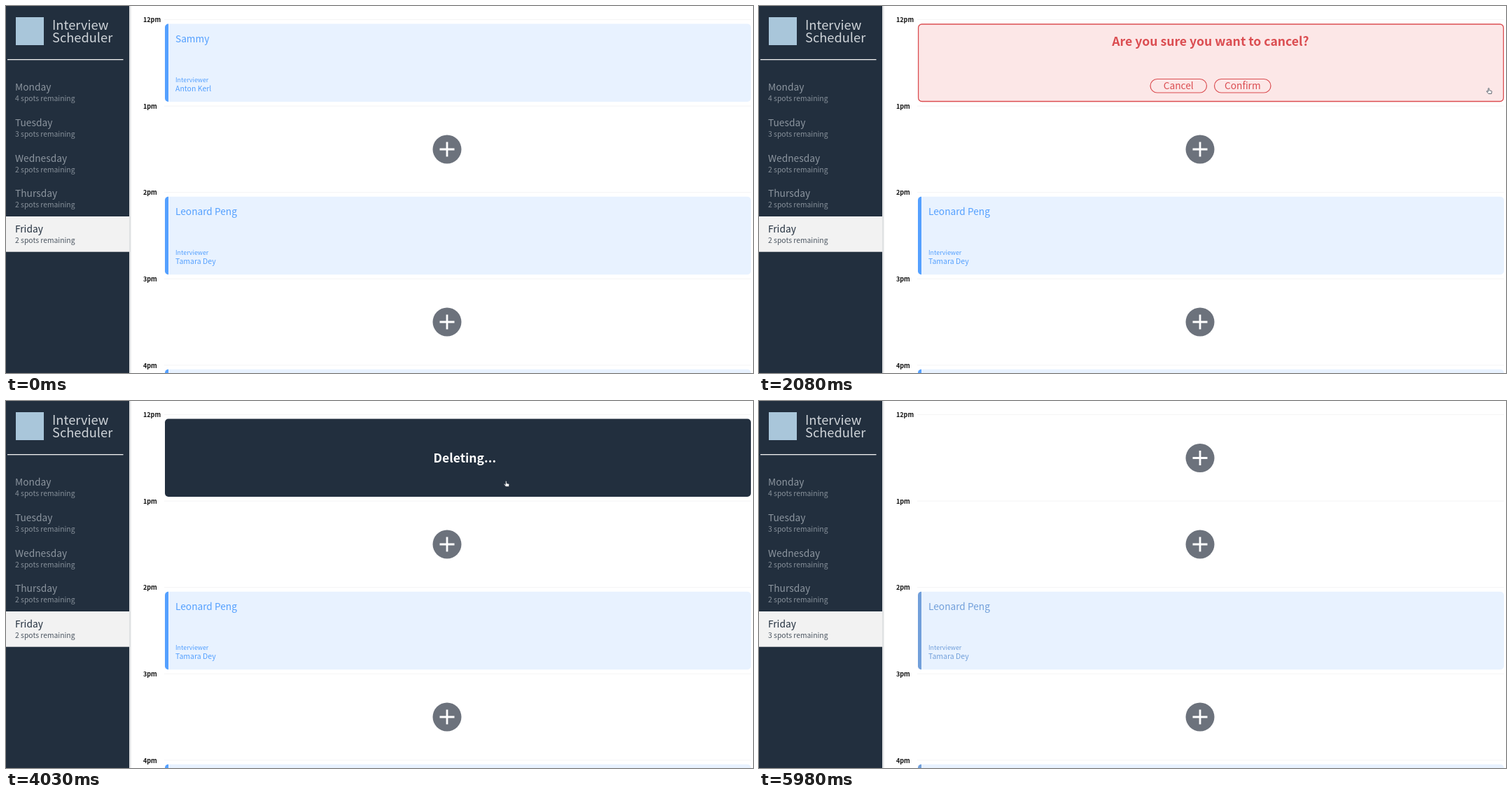
An HTML page for the animation above (6110 ms loop, 1067 px wide and 525 px high).

```html
<!DOCTYPE html>
<html lang="en">
<head>
<meta charset="utf-8">
<title>Interview Scheduler</title>
<style>
  html, body { margin: 0; width: 100%; height: 100%; overflow: hidden; background: #fff; }
  svg { display: block; --blue: #54a0ff; }
  svg.muted { --blue: #719fda; }
  text { font-family: "Noto Sans CJK JP", "Noto Sans CJK SC", "Noto Sans CJK", "Noto Sans", sans-serif; white-space: pre; }
</style>
</head>
<body>
<svg id="stage" width="1067" height="525" viewBox="0 0 1067 525"></svg>
<script>
const LOOP = 6110, STEP = 130, ROW = 123.6;
const NAVY = '#222f3e', BLUE = 'var(--blue)', RED = '#db4d51';
const stage = document.getElementById('stage');

const text = (x, y, size, fill, label, attrs = '') =>
  `<text x="${x}" y="${y}" font-size="${size}" fill="${fill}" ${attrs}>${label}</text>`;
const rect = (x, y, w, h, fill, attrs = '') =>
  `<rect x="${x}" y="${y}" width="${w}" height="${h}" fill="${fill}" ${attrs}/>`;
const group = (id, content) => `<g id="${id}">${content}</g>`;
const centered = 'text-anchor="middle"';

function sidebar() {
  const days = [['Monday', 4], ['Tuesday', 3], ['Wednesday', 2], ['Thursday', 2], ['Friday', 2]];
  const items = days.map(([day, spots], i) => {
    const y = 121 + i * 50.8, active = day === 'Friday';
    return text(13, y, 13.75, active ? NAVY : '#8c959f', day) +
      text(13, y + 15, 10.35, active ? '#4d5762' : '#87909a',
        `<tspan${active ? ' id="spots"' : ''}>${spots}</tspan> spots remaining`, 'font-weight="300"');
  });
  return rect(176, 0, 2.5, 525, '#dfe1e3') + rect(0, 0, 176, 525, NAVY) +
    rect(14, 16, 40, 40, '#a9c6da') +
    text(66, 34, 18.3, '#cfd4d9', 'Interview', 'font-weight="300"') +
    text(66, 52, 18.3, '#cfd4d9', 'Scheduler', 'font-weight="300"') +
    rect(2, 76, 165.5, 1.3, '#f2f2f2') +
    rect(0, 301, 176, 50.7, '#f2f2f2') + items.join('');
}

function hourLine(label, i) {
  const y = 19.5 + i * ROW;
  return rect(226, y - .5, 838, 1, '#f4f4f5') +
    text(196, y + 3.6, 9, '#111', label, 'font-weight="700"');
}

function details(y, name, interviewer, color) {
  return text(242, y + 26.5, 13.7, color, name) +
    text(242, y + 83.5, 8.9, color, 'Interviewer', 'font-weight="300"') +
    text(242, y + 96.5, 10.5, color, interviewer, 'font-weight="500"');
}

const panel = (y, fill, attrs = '') => rect(227, y, 837, 111.5, fill, `rx="5" ${attrs}`);

function appointment(y, name, interviewer) {
  return panel(y, '#e8f2ff') +
    `<path d="M232 ${y}v111.5a5 5 0 0 1-5-5v-101.5a5 5 0 0 1 5-5z" fill="${BLUE}"/>` +
    details(y, name, interviewer, BLUE);
}

const addButton = y => `<circle cx="630" cy="${y}" r="20.5" fill="#6c727c"/>
  <path d="M619.5 ${y}h21M630 ${y - 10.5}v21" stroke="#fff" stroke-width="2.8"/>`;

const actions = `<g fill="none" stroke="#d3e7ff" stroke-width="1.5" stroke-linejoin="round">
  <path d="M1022.5 110h-7q-2 0-2 2v9q0 2 2 2h9q2 0 2-2v-4"/>
  <path d="M1019 117.800l.6-3.400 7-6.800 2.800 2.800-7 6.800zM1024.800 109.500l2.800 2.800"/>
  <path d="M1034.800 110.200h13M1038.600 110v-2h5.400v2M1036.300 110.500v10.700q0 1.800 1.800 1.800h6.400q1.800 0 1.800-1.800v-10.700M1039.400 113v7.200M1041.300 113v7.200M1043.200 113v7.200"/>
</g>`;

const pill = (x, label) =>
  rect(x, 104.5, 80.5, 19.5, 'none', `rx="9.75" stroke="${RED}" stroke-width="1.2"`) +
  text(x + 40.3, 119.2, 13.7, RED, label, centered);

const TOP = 25.5, MIDDLE = 272.8;
const guest = ['Sammy', 'Anton Kerl'], second = ['Leonard Peng', 'Tamara Dey'];

stage.innerHTML = sidebar() +
  ['12pm', '1pm', '2pm', '3pm', '4pm'].map(hourLine).join('') +
  addButton(205) + addButton(452) +
  appointment(MIDDLE, ...second) + appointment(519.7, '', '') +
  group('show', appointment(TOP, ...guest)) +
  group('hover', panel(TOP, '#54a0ff') + details(TOP, ...guest, '#f1f7ff') + actions) +
  group('confirm',
    rect(227.6, 26, 835.8, 110.5, '#fce7e7', `rx="5" stroke="${RED}" stroke-width="1.3"`) +
    text(645, 57.3, 17.6, RED, 'Are you sure you want to cancel?', centered + ' font-weight="700"') +
    pill(559, 'Cancel') + pill(650.5, 'Confirm')) +
  group('deleting', panel(TOP, NAVY) +
    text(655.3, 88, 17.5, '#fff', 'Deleting...', centered + ' font-weight="700"')) +
  group('empty', addButton(81.5)) +
  group('cursor', `
    <path id="arrow" d="M-2-4v7l1.700-1.300 1.300 2.800 1.500-.7-1.200-2.600h2z" fill="#17202b" stroke="#fff" stroke-width=".7"/>
    <path id="hand" d="M-1.500.5v-4q0-1 .8-1t.8 1v2.300l2.800.6q1 .2.9 1.200l-.6 2.900h-4.200l-2.600-3.100q-.4-.9.6-.8z" fill="#fff" stroke="#3c4651" stroke-width=".8"/>`);

// start time and state of the first slot
const states = [[0, 'show'], [260, 'hover'], [2080, 'confirm'], [2990, 'deleting'], [4290, 'empty']];

// time, x, y, and the pointer shape used from then on
const path = [
  [130, 60, 60, 'arrow'], [260, 270, 76, 'arrow'], [390, 447, 85, 'arrow'],
  [1170, 934, 127, 'arrow'], [1430, 1014, 122, 'hand'], [1690, 1043, 122, 'hand'],
  [2340, 1043, 122, 'arrow'], [2730, 728, 120, 'hand'], [2860, 715, 119, 'hand'],
  [4810, 715, 119, 'arrow'], [5200, 560, 260, 'arrow'], [5460, 560, 260, 'arrow'],
  [5980, 400, 540, 'arrow']
];

const byId = id => document.getElementById(id);
const toggle = (id, on) => byId(id).setAttribute('display', on ? 'inline' : 'none');

function moveCursor(t) {
  const i = path.findLastIndex(key => key[0] <= t);
  toggle('cursor', i >= 0 && i < path.length - 1);
  if (i < 0 || i === path.length - 1) return;
  const [t0, x0, y0, shape] = path[i], [t1, x1, y1] = path[i + 1];
  const k = (t - t0) / (t1 - t0);
  byId('cursor').setAttribute('transform', `translate(${x0 + (x1 - x0) * k} ${y0 + (y1 - y0) * k})`);
  for (const name of ['arrow', 'hand']) toggle(name, name === shape);
}

function draw() {
  const t = Math.floor(performance.now() % LOOP / STEP) * STEP;
  const current = states.findLast(([start]) => start <= t)[1];
  for (const [, name] of states) toggle(name, name === current);
  byId('spots').textContent = current === 'empty' ? 3 : 2;
  stage.classList.toggle('muted', t >= 5460);
  moveCursor(t);
  requestAnimationFrame(draw);
}
draw();
</script>
</body>
</html>
```
